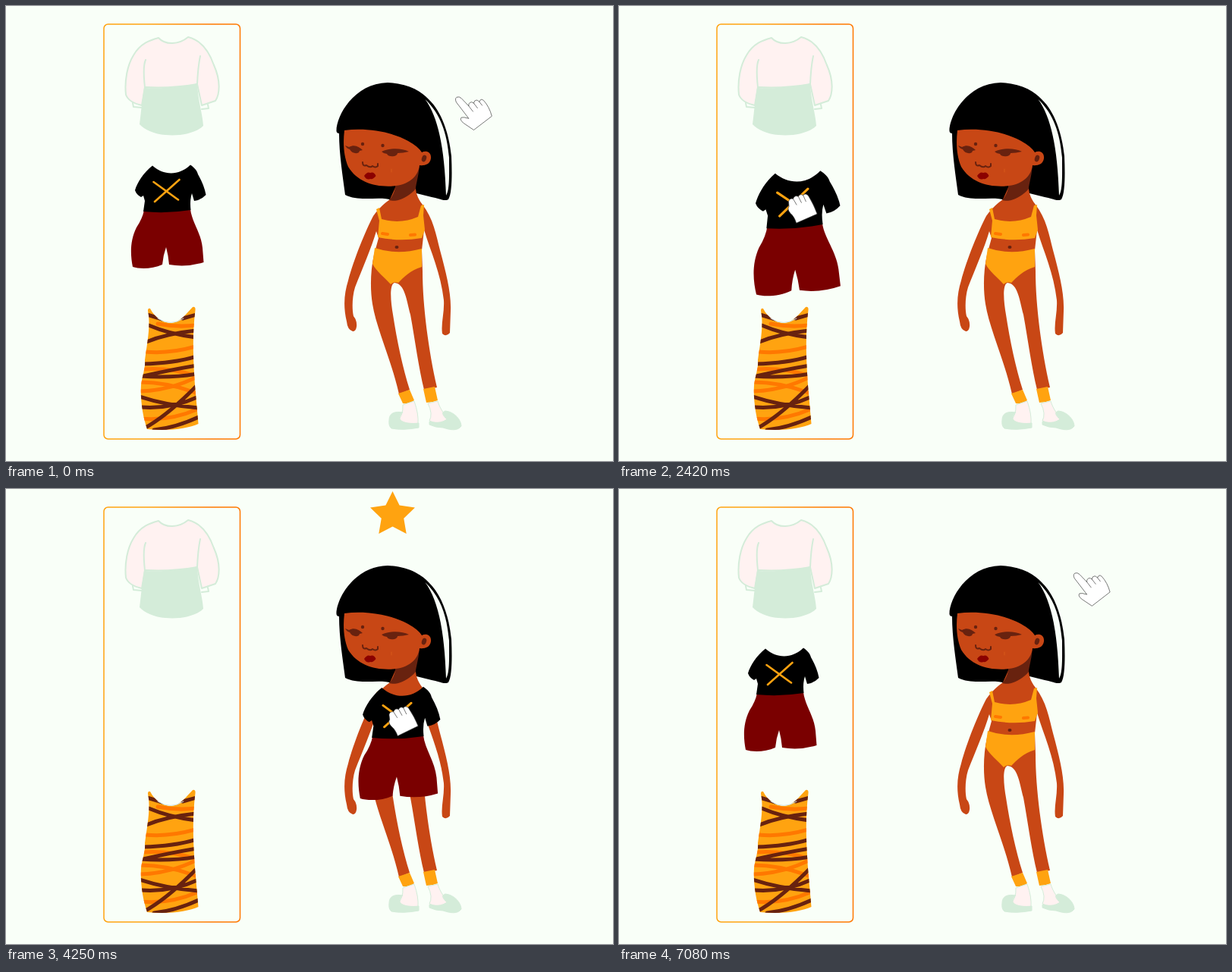
An HTML page for the animation above (7.12 s loop, 800 by 600 pixels).

```html
<!DOCTYPE html>
<html lang="en">
<head>
<meta charset="utf-8">
<title>Dress-up doll</title>
<style>
  html, body { margin: 0; width: 100%; height: 100%; overflow: hidden; background: #f9fff8; }
  svg { display: block; width: 800px; height: 600px; }
  .skin { fill: #c84715; }
  .dark { fill: #68220f; }
  .sun { fill: #ffa310; }
  .mint { fill: #d4ecd9; }
  .pink { fill: #fff2f1; }
  .line { fill: none; stroke-linecap: round; stroke-linejoin: round; }
</style>
</head>
<body>
<svg viewBox="0 0 800 600">
  <defs>
    <linearGradient id="edge" gradientUnits="userSpaceOnUse" x1="129" y1="0" x2="309" y2="0">
      <stop offset=".3" stop-color="#ffa310"/><stop offset=".8" stop-color="#ff7800"/>
    </linearGradient>
    <clipPath id="dressClip"><path id="dressShape" d="M187 402Q187 398 190 399C196 411 207 418 218 418C230 417 238 405 246 397Q250 396 249.500 401C246 430 246 455 249 500L253.500 551C240 557 215 561 186 558C180 540 177 520 178 500C180 485 184 478 183 467C186 445 191 420 187 402Z"/></clipPath>
  </defs>

  <rect x="129" y="24" width="179.500" height="547" rx="5.500" fill="none" stroke="url(#edge)" stroke-width="1.500"/>

  <!-- sweater and skirt -->
  <g stroke="#d4ecd9" stroke-width="2" stroke-linejoin="round">
    <path class="pink" d="M201 42C210 52 228 51 240 41C257 45 267 58 274 78C283 98 282 116 276 125L258 131L252 103Q218 109 183 107L179 131C170 129 161 125 158 117C156 98 160 78 168 65C177 49 190 45 201 42Z"/>
    <path class="line" d="M184 71Q180 80 183 107M256 66Q253 80 252 103M167 128L168 133L179 134M258 136L267 135L266 130"/>
  </g>
  <path class="mint" d="M182 108C210 109 235 107 252 102C253 125 259 142 260 158C250 168 228 172 210 170C196 169 182 163 176 156C178 140 179 125 182 108Z"/>

  <!-- striped dress -->
  <use href="#dressShape" class="sun"/>
  <g clip-path="url(#dressClip)" class="line" stroke-width="5">
    <path stroke="#ff7800" d="M200 419Q225 424 250 421M184 456Q215 459 250 449M180 479Q215 476 252 488M176 496Q215 496 252 511M177 508Q215 507 250 490M177 544Q215 548 254 531"/>
    <path stroke="#68220f" d="M186 407L206 413M188 421Q216 433 251 437M185 443Q212 432 251 428M233 412L251 407M180 472Q222 471 251 462M176 488Q218 491 251 485M176 489Q215 480 251 474M176 515Q212 527 255 530M178 529Q218 532 254 515M182 557Q213 540 252 500M195 559Q224 556 256 541"/>
  </g>
  <path class="line" stroke="#d0e4ea" d="M200 412Q217 423 234 412"/>

  <path id="stars" class="sun"/>

  <!-- doll -->
  <path d="M435.500 165C435 146 458 102 503 101C530 102 548 113 557 123C574 139 584 168 587 198C588 222 588 247 583 255C579 258 571 254 561 252L541 247L510 256C491 250 466 259 447 249C444 225 439 196 439 168Q436 168 435.500 165Z"/>
  <path fill="#f9fff8" d="M552.500 123C569 146 578 185 580 250C585 242 584 222 584 200C581 167 573 143 552.500 123Z"/>
  <path class="skin" d="M540 235C539 248 545 257 549 262C563 280 567 302 572 322C580 352 587 378 586 402L585 431Q580 437 575 432C573 419 578 404 577 388C573 352 560 325 551 295L548 322L549 350C549 395 557 455 568 503L551 506C544 478 539 440 533 407C528 389 526 366 512 365C505 367 507 390 510 407C515 440 523 478 532 506L518 512C509 470 488 425 483 393C480 375 480 350 485 328L491 306L488 297C482 318 469 348 460 371C456 384 456 400 458 409Q463 415 462 423Q461 429 457 429Q450 427 449 416C444 395 446 378 451 362C458 335 474 296 484 277C492 266 499 260 506 255L515 235Z"/>
  <path class="dark" d="M510 237C531 234 540 223 545 209C544 224 540 236 540 241C529 254 513 259 505 256C510 250 513 244 513 237Z"/>
  <path class="skin" d="M446 164C475 160 509 166 530 178C539 183 545 188 548 193C554 190 561 193 560 201C559 209 551 211 545 210C543 225 531 236 510 237.500C486 239 463 232 451 212C445 198 444 181 446 164Z"/>
  <g class="dark">
    <ellipse cx="551" cy="201" rx="3" ry="4.500" transform="rotate(20 551 201)"/>
    <circle cx="470" cy="182" r="2.200"/><circle cx="496.500" cy="184" r="2.200"/>
    <path d="M447 184L452 186C459 182 465 185 470 190L466 191C465 196 456 195 453 189Q449 188 447 184Z"/>
    <path d="M495 192C506 187 521 187 531 192Q523 194 516 194C516 199 504 200 502 195Q498 195 495 192Z"/>
    <ellipse cx="515" cy="318" rx="2.500" ry="2"/>
  </g>
  <path class="line" stroke="#68220f" stroke-width="2" d="M470 206Q470 212 475 210Q480 214 483 211Q487 214 490 211L490 208"/>
  <path fill="#8b0000" d="M472 224Q476 218 480 220Q485 218 487.500 224Q484 229 480 228Q475 230 472 224Z"/>
  <path class="line" stroke="#d85a1a" d="M508 215V219"/>
  <path class="sun" d="M488 268L492 266L495 281Q520 288 543 278L547 263L551 262L550 276L552 295L548 306Q518 311 490 305L492 283Z"/>
  <path class="sun" d="M486 319Q515 329 548 320V344C532 349 525 357 517 365Q511 363 507 367C500 359 488 350 483 340Z"/>
  <path class="line" stroke="#ff7800" stroke-width="4" d="M496 300L503 301M533 302L539 301.500"/>
  <path class="sun" d="M517 511L532 506L538 520Q531 525 523 524ZM550 505L565 502L569 520Q562 523 554 523Z"/>
  <g stroke="#d4ecd9">
    <path class="pink" d="M523 526L538 521Q544 538 543 551L514 550Q524 540 523 526ZM556 524L569 521C572 532 579 539 583 547Q570 553 558 547Q563 538 556 524Z"/>
    <path class="mint" d="M505 546C505 537 512 534 523 536C510 548 530 552 544 550V556Q522 560 508 557Q504 554 505 546ZM558 548C570 551 577 548 581 545C576 540 573 536 579 534C591 535 600 546 600 554C595 561 585 559 576 556Q566 556 558 552Z"/>
  </g>

  <!-- outfit, drawn around the cross on the shirt -->
  <g id="outfit"><g transform="translate(-211.500 -243.500)">
    <path fill="#7a0000" d="M182 269L243 268C245 285 257 299 259 319L260.500 338Q238 345 215 341Q214 329 211 318Q207 329 206 341C193 347 176 347 167 344C164 329 163 310 172 292Q180 280 182 269Z"/>
    <path d="M170 243C173 233 181 220 193 210.500C207 223 227 225 243 209.500C248 213 252 217 253 222C258 231 262 240 263.500 249Q257 256 248 257L245 247Q242 256 243.500 269Q212 274 181 271L183 257L181 250L178 252Q172 249 170 243Z"/>
    <path class="line" stroke="#ffa310" stroke-width="2.600" d="M194.500 232L227 255.500M228.500 229L196 258"/>
  </g></g>

  <!-- hand poses share the wrist centre as origin -->
  <g id="hand" fill="#fff" stroke="#333" stroke-width=".6" stroke-linejoin="round">
    <g id="point">
      <path d="M-15 0L-20 -15Q-22 -22 -18 -23Q-15 -22 -11 -16L-11 -43Q-10 -48 -6.500 -48Q-3 -47 -2.500 -43L-1 -29Q1 -33 5 -31Q6 -30 6.500 -28Q9 -31 12 -29Q13 -28 13.500 -25Q18 -28 19 -23Q20 -12 15 0Z"/>
      <path class="line" d="M-1 -29V-20M6.500 -28V-20M13.500 -25V-19"/>
    </g>
    <g id="fist">
      <path d="M-15 0Q-14 -9 -17 -15Q-19 -22 -15 -24L-13 -30Q-10 -34 -6 -31Q-2 -35 1.500 -31Q5 -34 8 -30Q12 -32 14 -27Q16 -12 15 0Z"/>
      <path class="line" d="M-6 -31L-5 -22M1.500 -31L2 -22M8 -30V-21"/>
    </g>
  </g>
</svg>
<script>
const LOOP = 7120, SHIFT = 240;   // the page opens 240 ms into the story
const $ = id => document.getElementById(id);

const span = (t, from, to) => Math.min(1, Math.max(0, (t - from) / (to - from)));
const bump = (t, from, to) => Math.sin(Math.PI * span(t, from, to));
function ease(t, from, to, power = 3) {
  const u = span(t, from, to);
  return u < .5 ? (2 * u) ** power / 2 : 1 - (2 - 2 * u) ** power / 2;
}
// point on a quadratic curve from a to c, bent towards b
const arc = (u, a, b, c) =>
  a.map((v, i) => v * (1 - u) ** 2 + 2 * u * (1 - u) * b[i] + c[i] * u * u);

function place(el, [x, y], turn, scale) {
  el.setAttribute('transform', `translate(${x} ${y}) rotate(${turn}) scale(${scale})`);
}

function star(x, y, turn, r) {
  const points = Array.from({ length: 10 }, (_, i) => {
    const a = i * Math.PI / 5 + turn * Math.PI / 180, d = i % 2 ? r / 2 : r;
    return `${x + d * Math.sin(a)} ${y - d * Math.cos(a)}`;
  });
  return `M${points.join('L')}Z`;
}

// one star rises over the head, then pairs slide out along a parabola
function fan(t) {
  const settle = ease(t, 4760, 5250, 2);
  const y = 150 - 116 * ease(t, 3740, 4440) + 13 * settle;
  let d = star(509.5, y, 0, 31 - 5 * settle);
  for (const rank of [1, 2]) for (const side of [-1, 1]) {
    const start = 3640 + 600 * rank + (side > 0 ? 40 : 0);
    const u = ease(t, start, start + 1400), dx = 44.5 * rank * u;
    d += star(509.5 + side * dx, y + .0066 * dx * dx, side * 30 * u, (26 - 2 * rank) * Math.min(1, 2 * u));
  }
  return d;
}

function draw(now) {
  const t = (now + SHIFT) % LOOP;
  const reach = ease(t, 0, 1600, 2), drag = ease(t, 2200, 4080), leave = ease(t, 4080, 6640);
  const sway = bump(t, 3100, 4050) - bump(t, 2400, 3400);

  const cross = arc(drag, [211.5, 243.5], [363, 382], [515.5, 298]);
  const size = 1 - .05 * bump(t, 1900, 2240) + .19 * ease(t, 2200, 2490, 2) - .096 * ease(t, 3240, 4080, 2);
  place($('outfit'), cross, 3 * sway, size);

  const grip = [cross[0] + 10 - 11 * sway, cross[1] + 19 - 3 * sway];
  const wrist = t < 1600 ? arc(reach, [651, 123], [400, 482], grip)
    : arc(leave, grip, [652, 380], [746, 476]);
  const turn = -38 + 12 * reach + 10 * bump(t, 240, 1600) + 22 * bump(t, 2600, 4400) + 6 * leave;
  place($('hand'), wrist, turn, 1 - .22 * bump(t, 1900, 2240));

  const grabbing = t >= 1960 && t < 4700;
  $('point').style.display = grabbing ? 'none' : '';
  $('fist').style.display = grabbing ? '' : 'none';
  $('stars').setAttribute('d', fan(t));
}

const start = performance.now();
function tick() {
  draw(performance.now() - start);
  requestAnimationFrame(tick);
}
tick();
</script>
</body>
</html>
```
